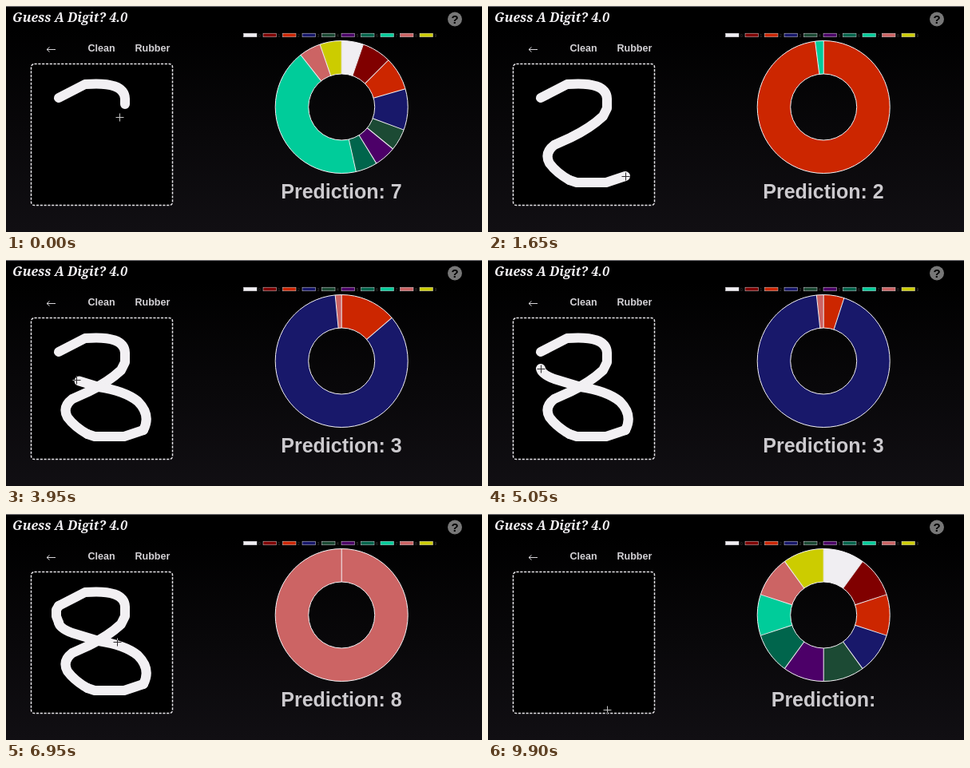
Recreate the animation shown at these times as an HTML page. Size 596 px wide and 283 px high, loop 9.95 s.

```html
<!DOCTYPE html>
<html lang="en">
<meta charset="utf-8">
<title>Digit prediction</title>
<style>
  html, body { margin: 0; width: 100%; height: 100%; overflow: hidden; background: #000; }
  svg { display: block; width: 596px; height: 283px; font: bold 12.5px "Liberation Sans", Arial, sans-serif; fill: #d4d2d6; }
  #title { font: italic bold 16px "Noto Serif", serif; fill: #f4f2f5; }
  #label { font-size: 25px; fill: #cccace; text-anchor: middle; }
  #legend text { font-size: 5px; font-weight: normal; fill: #444; }
  #ink { fill: none; stroke: #f2f0f3; stroke-width: 12; stroke-linecap: round; stroke-linejoin: round; }
  #cross { mix-blend-mode: difference; }
</style>
<svg viewBox="0 0 596 283">
  <defs>
    <linearGradient id="night" x2="0" y2="1">
      <stop offset=".1" stop-color="#000"/>
      <stop offset="1" stop-color="#110f13"/>
    </linearGradient>
  </defs>
  <rect width="596" height="283" fill="url(#night)"/>
  <rect width="596" height="1" fill="#757377"/>
  <text id="title" x="8" y="20">Guess A Digit? 4.0</text>
  <circle cx="562" cy="16.5" r="9" fill="#777"/>
  <text x="562" y="22" text-anchor="middle" style="font-size:15px;fill:#000">?</text>

  <path d="M62 54.5H51m3.5-3L51 54.5l3.5 3" fill="none" stroke="#d4d2d6"/>
  <rect id="hover" x="96" y="41" width="48" height="24" rx="8" fill="#f0eef2"/>
  <text id="clean" x="102.5" y="57">Clean</text>
  <text x="161.5" y="57">Rubber</text>

  <rect x="31.5" y="72.5" width="177" height="177" rx="4" fill="#000" stroke="#e4e2e6" stroke-width="1.5" stroke-dasharray="3.2 1.6"/>
  <g id="ink"></g>

  <g id="legend"></g>
  <g transform="translate(420.2 126.5)" fill="none" stroke="#f4f2f5">
    <g id="ring" transform="rotate(-90)" stroke-width="41.5"></g>
    <circle r="83"/><circle r="41.5"/>
    <g id="spokes"></g>
  </g>
  <text id="label" x="420" y="241"></text>

  <path id="cross" d="M-5 0H5M0-5V5" stroke="#c4c4c4" fill="none"/>
  <path id="arrow" d="M0 0V8L2 6.3 3.4 9.2 4.8 8.5 3.5 5.8H6Z" fill="#fff" stroke="#000" stroke-width=".6"/>
</svg>
<script>
const LOOP = 9950, STEP = 50, CLEAR = 8433, LEAD = 100;
const colors = ['#f0eef2', '#800000', '#cc2600', '#18186a', '#1c4a34',
                '#4c0068', '#00654c', '#00cc9a', '#cc6464', '#cccc00'];

const $ = id => document.getElementById(id);
const add = (parent, tag, attrs) => {
  const node = document.createElementNS('http://www.w3.org/2000/svg', tag);
  for (const name in attrs) node.setAttribute(name, attrs[name]);
  return parent.appendChild(node);
};
const clamp = x => Math.max(0, Math.min(1, x));
const progress = (t, from, to) => clamp((t - from) / (to - from));
const mix = (a, b, k) => a.map((v, i) => v + (b[i] - v) * k);

// The pointer travels these legs; those before the last pen lift leave ink.
const PEN_UP = 5500;
const legs = [
  [-500, 0, 'M66 115L99 98Q148 94 149 116V123'],
  [0, 800, 'M149 123V128L144 138Q128 153 103 165L83 174Q70 184 77 197Q86 209 102 218'],
  [800, 1400, 'M102 218L111 221H148L172 213'],
  [2900, 3050, 'M172 213Q182 194 165 177Q149 164 116 159'],
  [3050, 5050, 'M116 159L83 149Q67 143 66 136'],
  [5150, PEN_UP, 'M66 136L63 128V120L66 115'],
  [PEN_UP, 6950, 'M66 115Q104 144 139.5 160'],
  [7100, 7700, 'M139.5 160L121 56'],
  [8450, 8650, 'M121 56V68'],
  [8750, 9900, 'M121 68Q94 130 149.5 245'],
].map(([from, to, d]) => {
  const path = add($('ink'), 'path', { d });
  return { from, to, path, length: path.getTotalLength(), inked: to <= PEN_UP };
});

// Each prediction eases the ring from wherever it is to new shares.
const even = colors.map(() => 10);
const only = shares => colors.map((_, i) => shares[i] || 0);
const firstShares = mix(even, only({ 1: 4, 2: 6, 3: 10, 7: 80 }), .47);
const predictions = [
  { at: 520, digit: 2, shares: only({ 2: 95, 7: 5 }) },
  { at: 1450, digit: 2, shares: only({ 2: 100 }) },
  { at: 3500, digit: 3, shares: only({ 2: 5, 3: 93.3, 8: 1.7 }) },
  { at: 5600, digit: 8, shares: only({ 8: 100 }) },
  { at: CLEAR, digit: '', shares: even },
];
const easeOutQuart = x => 1 - (1 - x) ** 4;

const wedges = colors.map((color, i) => {
  const x = 297.5 + 24.5 * i;
  add($('legend'), 'rect', { x, y: 34.2, width: 16.5, height: 4.6, fill: color, stroke: '#d8d6da', 'stroke-width': .5 });
  add($('legend'), 'text', { x: x + 18.5, y: 38.5 }).textContent = i;
  return {
    slice: add($('ring'), 'circle', { r: 62.25, pathLength: 100, stroke: color }),
    spoke: add($('spokes'), 'path', { d: 'M0-41.5V-83' }),
  };
});

function drawInk(t) {
  for (const { from, to, path, length, inked } of legs) {
    const done = progress(t, from, to);
    path.style.display = inked && done && t < CLEAR ? '' : 'none';
    path.setAttribute('stroke-dasharray', `${done * length} ${length + 1}`);
  }
}

function drawRing(t) {
  let shares = firstShares, digit = 7, start = 0;
  for (const p of predictions.filter(p => p.at <= t)) {
    shares = mix(shares, p.shares, easeOutQuart(progress(t, p.at, p.at + 1000)));
    digit = p.digit;
  }
  wedges.forEach(({ slice, spoke }, i) => {
    slice.style.display = spoke.style.display = shares[i] > .01 ? '' : 'none';
    slice.setAttribute('stroke-dasharray', `0 ${start} ${shares[i]} 100`);
    spoke.setAttribute('transform', `rotate(${start * 3.6})`);
    start += shares[i];
  });
  $('label').textContent = `Prediction: ${digit}`.trim();
}

function drawPointer(t) {
  const ahead = t + LEAD;
  const leg = legs.filter(l => l.from <= ahead).pop();
  const { x, y } = leg.path.getPointAtLength(leg.length * progress(ahead, leg.from, leg.to));
  const onPad = y > 72;
  $('cross').style.display = onPad ? '' : 'none';
  $('arrow').style.display = onPad ? 'none' : '';
  $('cross').setAttribute('transform', `translate(${Math.floor(x) + .5} ${Math.floor(y) + .5})`);
  $('arrow').setAttribute('transform', `translate(${x} ${y})`);

  const hover = progress(t, 7560, 7710) * (1 - progress(t, 8650, 8850));
  $('hover').style.opacity = hover;
  $('clean').style.fill = hover > .5 ? '#111' : '';
}

function frame(now) {
  const t = Math.floor(now % LOOP / STEP) * STEP;
  drawInk(t);
  drawRing(t);
  drawPointer(t);
  requestAnimationFrame(frame);
}
requestAnimationFrame(frame);
</script>
</html>
```
